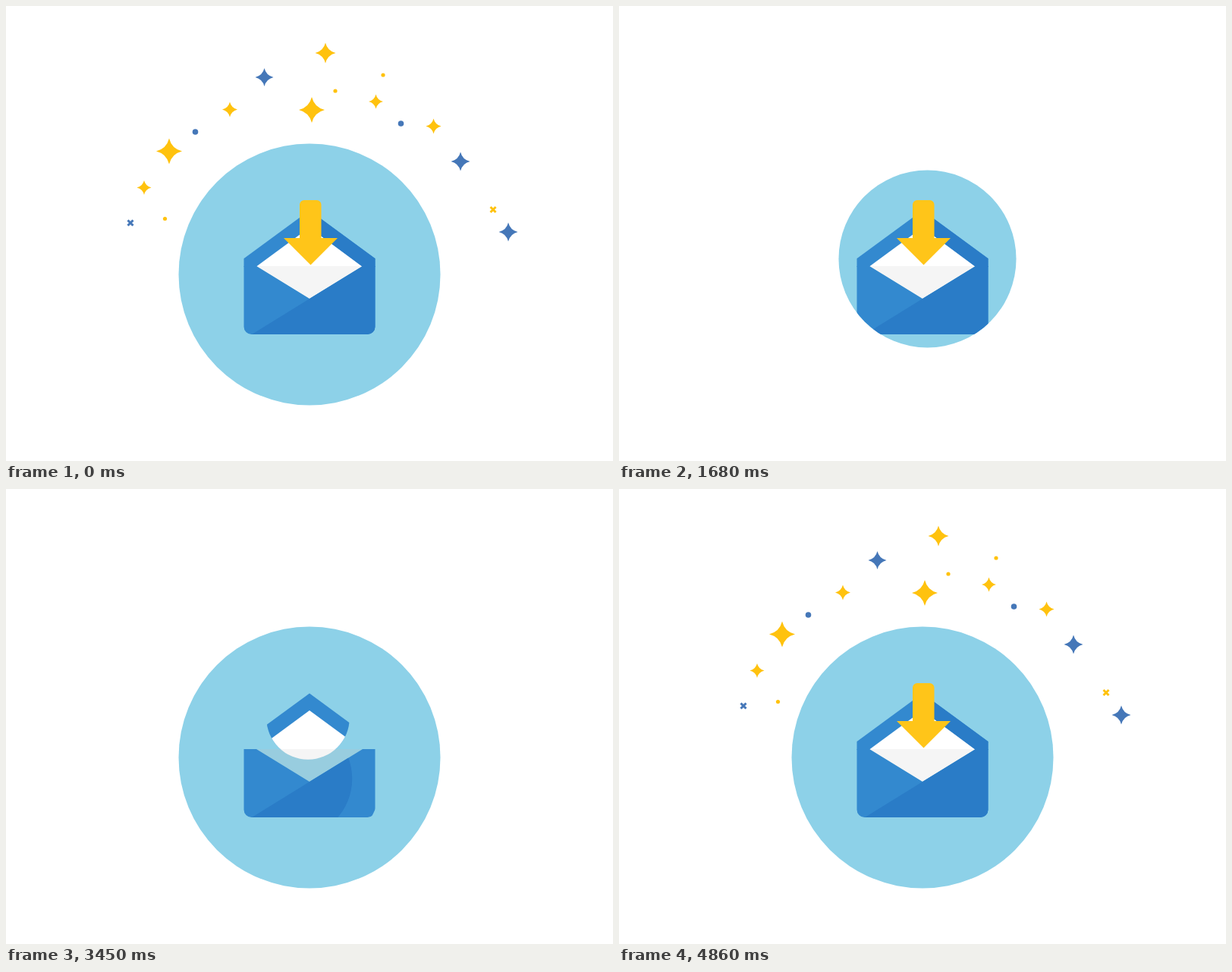
An HTML page without scripts for the animation above (5.43 s loop, 800 by 600 pixels).

```html
<!DOCTYPE html>
<html lang="en">
<head>
<meta charset="utf-8">
<title>Message received</title>
<style>
html, body { margin: 0; width: 100%; height: 100%; overflow: hidden; background: #fff; }
svg { display: block; width: 100vw; height: 100vh; }

.iris, .disc, .arrow { animation: 5430ms linear infinite; }
.arrow { animation-name: drop; }
.disc { fill: #8dd1e8; animation-name: disc; }
.close { animation-name: close; }
.flap { animation-name: flap; }
.body { animation-name: body; }
.shade { animation-name: shade; }
.sparkle { animation-name: sparkle; }

.light { fill: #3389cf; }
.dark { fill: #2a7cc7; }
.gold { fill: #ffc20e; stroke: #ffc20e; }
.blue { fill: #4577b8; stroke: #4577b8; }

/* everything shrinks away, then the stage opens again while empty */
@keyframes close {
  0%, 25.4% { r: 400px; }
  25.414% { r: 273px; }
  30.94% { r: 117.5px; }
  35.36%, 40% { r: 0; }
  40.01%, 100% { r: 400px; }
}
@keyframes disc {
  0%, 36% { r: 172.5px; }
  36.01%, 50.1% { r: 0; }
  50.276% { r: 2px; }
  60.22%, 100% { r: 172.5px; }
}
@keyframes flap {
  0%, 36% { r: 120px; }
  36.01%, 60.4% { r: 0; }
  63.536% { r: 54.5px; }
  66.85%, 100% { r: 100px; }
}
@keyframes body {
  0%, 36% { r: 140px; }
  36.01%, 60.4% { r: 0; }
  63.536% { r: 105px; }
  64.64%, 100% { r: 140px; }
}
@keyframes shade {
  0%, 36% { r: 130px; }
  36.01%, 60.4% { r: 0; }
  63.536% { r: 78px; }
  66.85%, 100% { r: 125px; }
}
@keyframes drop {
  0%, 36% { transform: none; opacity: 1; }
  36.01%, 71.26% { transform: translateY(-175px); opacity: 0; }
  71.27% { transform: translateY(-175px); opacity: 1; animation-timing-function: ease-out; }
  74.59% { transform: translateY(18px); animation-timing-function: ease-in-out; }
  75.69% { transform: translateY(9px); }
  77.35% { transform: translateY(-4px); animation-timing-function: ease-in-out; }
  79.56%, 100% { transform: none; opacity: 1; }
}
@keyframes sparkle {
  0%, 36% { r: 300px; }
  36.01%, 81.5% { r: 0; }
  89.32%, 100% { r: 288px; }
}
</style>
</head>
<body>
<svg viewBox="0 0 800 600">
  <defs>
    <clipPath id="close"><circle class="iris close" cx="406.5" cy="333.5" r="400"/></clipPath>
    <clipPath id="flap"><circle class="iris flap" cx="398" cy="302" r="120"/></clipPath>
    <clipPath id="body"><circle class="iris body" cx="389" cy="382" r="140"/></clipPath>
    <clipPath id="shade"><circle class="iris shade" cx="378" cy="382" r="130"/></clipPath>
    <clipPath id="sparkle"><circle class="iris sparkle" cx="417" cy="180" r="300"/></clipPath>
    <path id="star" stroke="none" d="M0-1Q.2-.2 1 0Q.2 .2 0 1Q-.2 .2-1 0Q-.2-.2 0-1Z"/>
    <path id="cross" stroke-width="3" d="M-3.5-3.5 3.5 3.5M-3.5 3.5 3.5-3.5"/>
  </defs>

  <g clip-path="url(#close)">
    <circle class="disc" cx="400" cy="354" r="172.5"/>

    <g clip-path="url(#body)">
      <path fill="#98cddf" d="M330 343H470L400 386Z"/>
    </g>
    <g clip-path="url(#flap)">
      <path class="light" d="M313.5 344V333L400 269.5 486.5 333V344Z"/>
      <path fill="#fff" d="M330 343.5 400 292 470 343.5Z"/>
      <path fill="#f5f5f5" d="M330 343H470L400 386Z"/>
    </g>
    <g clip-path="url(#body)">
      <path class="light" d="M313.5 343H330L400 386 470 343H486.5V423a10 10 0 0 1-10 10H323.500a10 10 0 0 1-10-10Z"/>
    </g>
    <g class="dark" clip-path="url(#shade)">
      <path d="M400 269.500 486.500 333V344H470L400 292Z"/>
      <path d="M400 386 470 343H486.500V423a10 10 0 0 1-10 10H324Z"/>
    </g>

    <path class="arrow" fill="#ffc519" d="M387 306V262a6 6 0 0 1 6-6H409.500a6 6 0 0 1 6 6V306H437L401.500 341.500 366 306Z"/>

    <g clip-path="url(#sparkle)">
      <g class="gold">
        <use href="#star" transform="translate(421 62) scale(13.5)"/>
        <use href="#star" transform="translate(403 137) scale(17)"/>
        <use href="#star" transform="translate(215 191.5) scale(17)"/>
        <use href="#star" transform="translate(295 136.500) scale(10)"/>
        <use href="#star" transform="translate(182 239.500) scale(9.5)"/>
        <use href="#star" transform="translate(487.500 126) scale(9.5)"/>
        <use href="#star" transform="translate(563.500 158.500) scale(10)"/>
        <use href="#cross" x="642" y="268.500"/>
        <g stroke="none">
          <circle cx="497" cy="91" r="2.600"/>
          <circle cx="434" cy="112" r="2.600"/>
          <circle cx="209.500" cy="280.500" r="2.600"/>
        </g>
      </g>
      <g class="blue">
        <use href="#star" transform="translate(340.500 94) scale(12)"/>
        <use href="#star" transform="translate(599 205) scale(12.500)"/>
        <use href="#star" transform="translate(662 298) scale(12.500)"/>
        <use href="#cross" x="164" y="286"/>
        <g stroke="none">
          <circle cx="249.500" cy="166" r="3.800"/>
          <circle cx="520.500" cy="155" r="3.800"/>
        </g>
      </g>
    </g>
  </g>
</svg>
</body>
</html>
```
